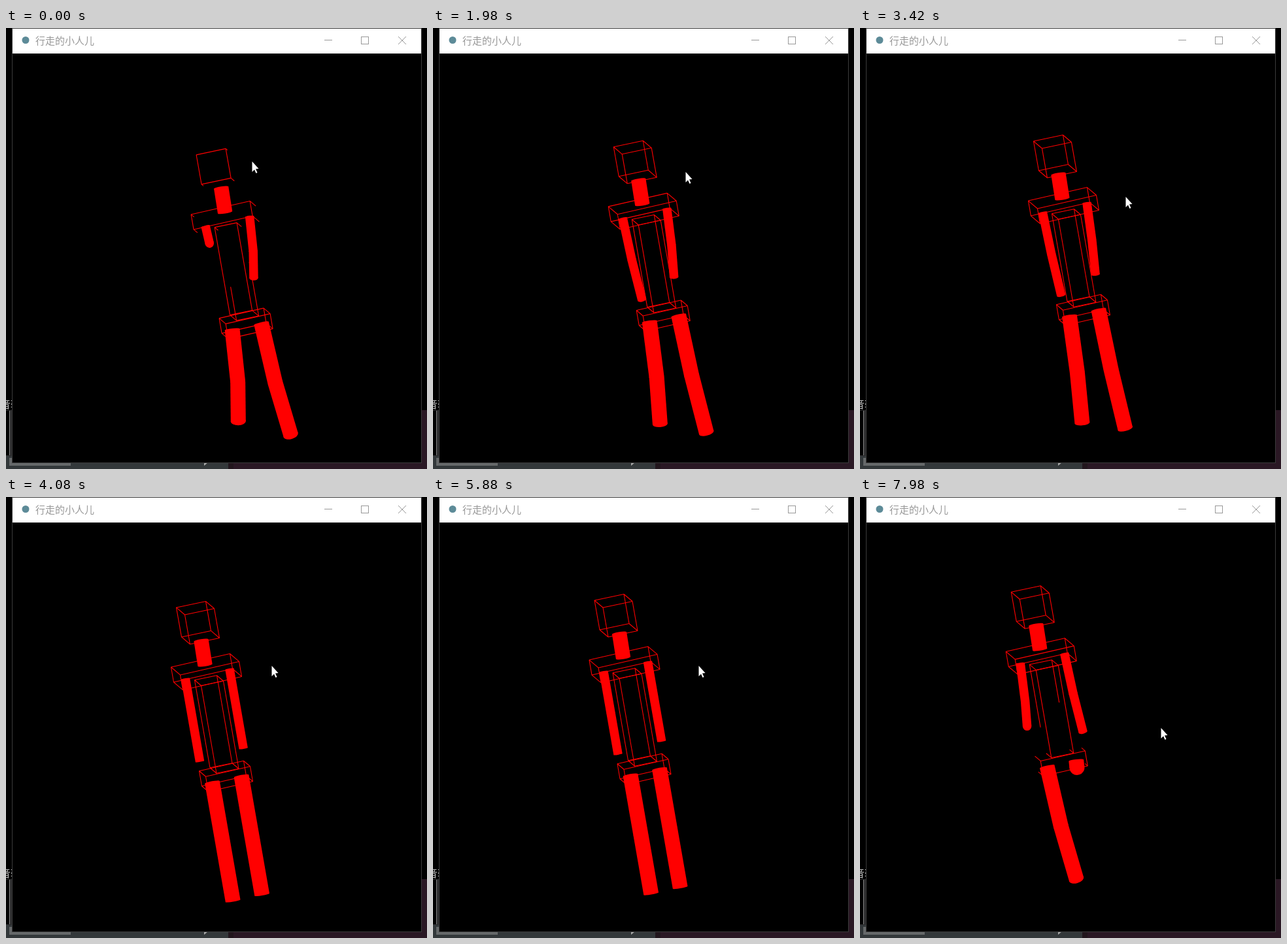
These frames come from a looping animation (644 by 674 pixels, 8 s). An HTML page with a canvas:

```html
<!DOCTYPE html>
<html lang="zh">
<head>
<meta charset="utf-8">
<title>行走的小人儿</title>
<style>
  html, body { margin: 0; width: 100%; height: 100%; overflow: hidden; background: #000; }
  canvas { display: block; }
</style>
</head>
<body>
<canvas id="stage" width="644" height="674"></canvas>
<script>
const ctx = document.getElementById('stage').getContext('2d');
const LOOP = 8000, STEP = 60;
const RED = '#f00';

// Model points are [x, y, w]; w is depth, drawn as an oblique offset.
const SKEW = 0.85;
const project = ([x, y, w]) => [x + w, y + SKEW * w];
const mix = (a, b, k) => a.map((n, i) => n + (b[i] - n) * k);

// The viewing volume is a slab, RANGE deep; the figure drifts through it.
const RANGE = 77;
const slab = ([x, y, w], t) =>
  -6.1 + 0.06 * (x - 253.5) + 0.045 * (y - 163.5) + 0.0083 * t - w;

// Visible part of segment a-b as [from, to] fractions, or null.
function clip(a, b, t, slack = 0) {
  const g0 = slab(a, t), g1 = slab(b, t);
  let from = 0, to = 1;
  for (const [d0, d1] of [[g0 + slack, g1 + slack], [RANGE + slack - g0, RANGE + slack - g1]]) {
    if (d0 < 0 && d1 < 0) return null;
    if (d0 < 0) from = Math.max(from, d0 / (d0 - d1));
    if (d1 < 0) to = Math.min(to, d0 / (d0 - d1));
  }
  return from < to ? [from, to] : null;
}

function rect(color, x, y, w, h) {
  ctx.fillStyle = color;
  ctx.fillRect(x, y, w, h);
}

function polyline(points) {
  ctx.beginPath();
  points.forEach(p => ctx.lineTo(...p));
  ctx.stroke();
}

// Wire box: mid-depth corner, width vector, height vector, half depth.
const boxes = [
  [[253.5, 163.5], [45, -9.5], [8, 45], 6.5],
  [[246, 255], [90, -20.5], [4, 23], 7],
  [[280, 273], [34, -7], [23.5, 134], 5],
  [[287, 412], [68, -15.5], [4, 23], 5]
];

function drawBox([[x, y], u, v, half], t) {
  const corner = n => {
    const i = n & 1, j = n >> 1 & 1;
    return [x + i * u[0] + j * v[0], y + i * u[1] + j * v[1], n & 4 ? half : -half];
  };
  ctx.lineWidth = 1.1;
  for (let n = 0; n < 8; n++) {
    for (const bit of [1, 2, 4]) {
      if (n & bit) continue;
      const a = corner(n), b = corner(n | bit), seen = clip(a, b, t);
      if (seen) polyline(seen.map(k => project(mix(a, b, k))));
    }
  }
}

// Swing wave: rises and falls linearly between -1 and 1.
function swing(t) {
  const p = ((t - 30) / 1800 % 1 + 1) % 1;
  return 1 - Math.abs(4 * p - 2);
}

function disc(p, radius, squash, angle) {
  ctx.beginPath();
  ctx.ellipse(p[0], p[1], radius, radius * squash, angle, 0, 2 * Math.PI);
  ctx.fill();
}

// Two-part limb; the lower part turns about twice as far as the upper.
function drawLimb(top, length, width, upper, lower, t) {
  ctx.lineWidth = width;
  let start = [...top, 0];
  let squash = 0.15;
  for (const degrees of [upper, lower]) {
    const turn = degrees * Math.PI / 180, c = Math.cos(turn), s = Math.sin(turn);
    const end = [start[0] + 0.172 * length * c, start[1] + 0.985 * length * c,
                 start[2] + 0.2 * length * s];
    const seen = clip(start, end, t, 1.5);
    if (!seen) return;
    const cut = seen[1] < 1;
    const a = project(start), b = project(mix(start, end, seen[1]));
    const angle = Math.atan2(b[1] - a[1], b[0] - a[0]) + Math.PI / 2;
    polyline([a, b]);
    disc(a, width / 2, squash, angle);
    squash = Math.max(0.12, 0.85 * Math.abs(s));
    disc(b, width / 2, cut ? 1 : squash, angle);
    if (cut) return;
    start = end;
  }
}

function drawFigure(t) {
  ctx.save();
  ctx.translate(0.0075 * (5880 - t), 0.0061 * (5880 - t));
  ctx.strokeStyle = ctx.fillStyle = RED;
  boxes.forEach(box => drawBox(box, t));

  ctx.lineWidth = 22.5;
  polyline([[285, 208], [291, 246]]);
  disc([285, 208], 11.2, 0.15, -0.16);
  disc([291, 246], 11.2, 0.15, -0.16);

  const s = swing(t);
  const leg = s * (s > 0 ? 29 : 21.5), arm = s * 22;
  drawLimb([261, 267], 64, 13.5, -arm, -arm * 1.85, t);
  drawLimb([328.5, 252], 61.5, 13.5, arm, arm * 1.85, t);
  drawLimb([302, 425], 92, 23, leg, leg * 1.95, t);
  drawLimb([346.5, 415.5], 92, 23, -leg, -leg * 1.95, t);
  ctx.restore();
}

function drawDesktop() {
  rect('#000', 0, 0, 644, 674);
  ctx.font = '16px "Noto Sans CJK SC", "Noto Sans CJK", sans-serif';
  ctx.fillStyle = '#bbb';
  ctx.fillText('音转', -9, 581);
  rect('#2b2b2c', 0, 584, 10, 70);
  rect('#000', 0, 585, 5, 68);
  rect('#8a8a8a', 5, 585, 1, 68);
  rect('#33383a', 0, 654, 340, 20);
  rect('#66696a', 5, 657, 94, 12);
  rect('#22161d', 340, 664, 8, 10);
  rect('#2a1824', 348, 664, 296, 10);
  rect('#2a1824', 636, 584, 8, 90);
  ctx.fillStyle = '#aaa';
  ctx.beginPath();
  ctx.moveTo(303, 662);
  ctx.lineTo(309, 664);
  ctx.lineTo(303, 669);
  ctx.fill();
}

function drawWindow() {
  rect('#3a3a3a', 9, 0, 627, 665);
  rect('#000', 10, 39, 625, 625);
  rect('#fff', 10, 1, 625, 38);
  ctx.fillStyle = '#5d8b98';
  disc([30, 18.5], 5.5, 1, 0);
  ctx.font = '15px "Noto Sans CJK SC", "Noto Sans CJK", sans-serif';
  ctx.fillStyle = '#999';
  ctx.fillText('行走的小人儿', 45, 25);
  ctx.strokeStyle = '#999';
  ctx.lineWidth = 1;
  polyline([[487, 18.5], [499, 18.5]]);
  ctx.strokeRect(543.5, 13.5, 11, 11);
  polyline([[600, 13], [612, 25]]);
  polyline([[612, 13], [600, 25]]);
}

const pointerPath = [
  [0, 376, 203], [1800, 376, 203], [2400, 408, 257], [2760, 408, 257],
  [3000, 406, 257], [6600, 406, 257], [7200, 412, 263], [7980, 460, 352]
];

function drawPointer(t) {
  const next = Math.max(1, pointerPath.findIndex(p => p[0] >= t));
  const a = pointerPath[next - 1], b = pointerPath[next];
  const [, x, y] = mix(a, b, (t - a[0]) / (b[0] - a[0]));
  ctx.save();
  ctx.translate(Math.round(x), Math.round(y));
  ctx.fillStyle = '#fff';
  ctx.beginPath();
  [[0.5, 1], [0.5, 17], [4, 13.5], [6.5, 19], [8.5, 18], [6, 12.5], [10.5, 12]]
    .forEach(p => ctx.lineTo(...p));
  ctx.fill();
  ctx.restore();
}

function frame() {
  const t = Math.floor(performance.now() % LOOP / STEP) * STEP;
  drawDesktop();
  drawWindow();
  drawFigure(t);
  drawPointer(t);
  requestAnimationFrame(frame);
}
frame();
</script>
</body>
</html>
```
